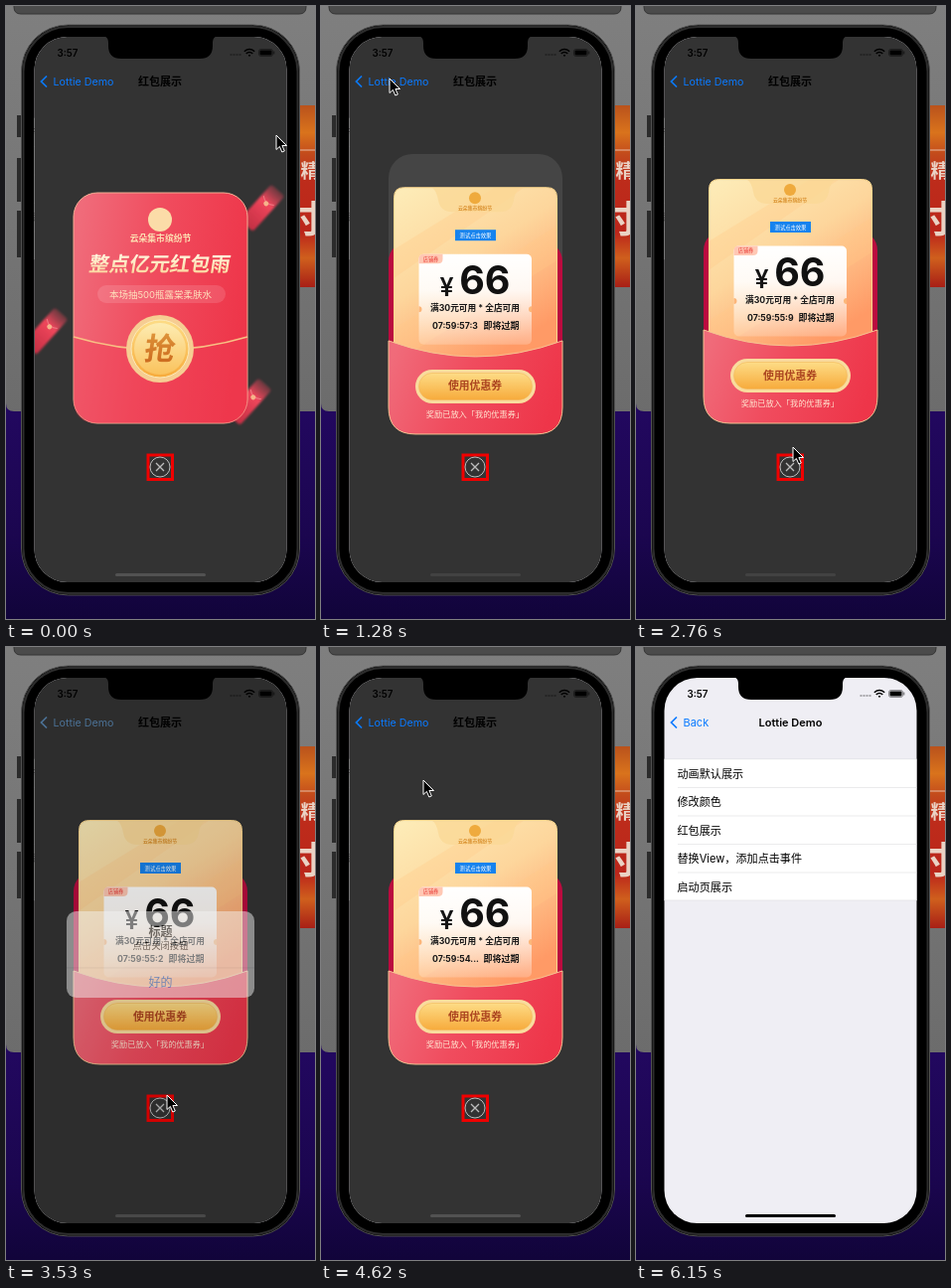
Animation, 311 px wide and 617 px high, one loop 6.45 s. Source, as an HTML page:

```html
<!DOCTYPE html>
<html lang="zh">
<head>
<meta charset="utf-8">
<style>
html, body { margin: 0; width: 100%; height: 100%; overflow: hidden; background: #160646; }
svg { display: block; width: 311px; height: 617px; }
text { font-family: Inter, "Noto Sans CJK SC", "Noto Sans CJK", sans-serif; text-anchor: middle; dominant-baseline: central; }
.left { text-anchor: start; }
.semi { font-weight: 600; }
.bold { font-weight: 700; }
.heavy { font-weight: 900; }
.nav { font-size: 11px; }
</style>
</head>
<body>
<svg viewBox="0 0 311 617" xmlns="http://www.w3.org/2000/svg">
<defs>
  <linearGradient id="wall" x2="0" y2="1"><stop stop-color="#7f7f7f"/><stop offset="1" stop-color="#6c6c6c"/></linearGradient>
  <linearGradient id="purple" x2="0" y2="1"><stop stop-color="#22085f"/><stop offset=".6" stop-color="#1b064f"/><stop offset="1" stop-color="#11043a"/></linearGradient>
  <linearGradient id="poster" x2="0" y2="1"><stop stop-color="#b9521c"/><stop offset=".15" stop-color="#d9731c"/><stop offset=".27" stop-color="#c24a1c"/><stop offset=".4" stop-color="#bd2c1b"/><stop offset=".7" stop-color="#bb261b"/><stop offset=".84" stop-color="#cf5f1d"/><stop offset="1" stop-color="#a81f16"/></linearGradient>
  <linearGradient id="red" y1=".3" y2=".5"><stop stop-color="#f06b7a"/><stop offset=".45" stop-color="#f04c5e"/><stop offset="1" stop-color="#ee3549"/></linearGradient>
  <linearGradient id="paper" x2=".6" y2="1"><stop stop-color="#fdedb9"/><stop offset=".5" stop-color="#fdd69c"/><stop offset="1" stop-color="#ff9a66"/></linearGradient>
  <linearGradient id="sheet" x2="0" y2="1"><stop stop-color="#fff"/><stop offset=".4" stop-color="#fff" stop-opacity=".9"/><stop offset="1" stop-color="#fff" stop-opacity=".2"/></linearGradient>
  <linearGradient id="gold" x2="0" y2="1"><stop stop-color="#fddc86"/><stop offset="1" stop-color="#f7ab3c"/></linearGradient>
  <linearGradient id="coin" x2="0" y2="1"><stop stop-color="#fdecb2"/><stop offset="1" stop-color="#fac25c"/></linearGradient>
  <linearGradient id="amber" x2="0" y2="1"><stop stop-color="#e0973c"/><stop offset="1" stop-color="#c9641a"/></linearGradient>
  <linearGradient id="cream" x2="0" y2="1"><stop stop-color="#fffbe9"/><stop offset="1" stop-color="#fbd496"/></linearGradient>
  <linearGradient id="streak" x2="0" y2="1"><stop stop-color="#e8455a" stop-opacity=".3"/><stop offset=".35" stop-color="#f0475c"/><stop offset="1" stop-color="#dd2f47" stop-opacity=".85"/></linearGradient>
  <filter id="soft" x="-50%" y="-50%" width="200%" height="200%"><feGaussianBlur stdDeviation="1"/></filter>
  <clipPath id="screen"><rect x="28.5" y="31" width="254" height="549" rx="33"/></clipPath>
  <clipPath id="stageClip"><rect x="29" y="44" width="254" height="381"/></clipPath>
  <clipPath id="paperClip"><path d="M73.500 345V184.500q0-10 10-10h144q10 0 10 10V345z"/></clipPath>
  <g id="envelope" transform="rotate(42)">
    <rect x="-9" y="-24" width="18" height="48" rx="3" fill="url(#streak)" filter="url(#soft)"/>
    <path d="M-7-10q7 6 14 0" fill="none" stroke="#f7a2a0" opacity=".6"/>
    <circle cy="-6" r="2.500" fill="#f6b48a"/>
  </g>
</defs>

<rect width="311" height="410" fill="url(#wall)"/>
<rect y="408" width="311" height="209" fill="url(#purple)"/>
<path d="M0 400q0 8 8 8H0z" fill="#22085f"/>
<path d="M8-5h294v6q0 7-7 7H15q-7 0-7-7z" fill="#4b4b4b" stroke="#343434"/>
<rect x="290" y="100" width="21" height="183" fill="url(#poster)"/>
<path d="M295 145h16" stroke="#dd9a78" stroke-width="1.500"/>
<text x="306" y="166" font-size="19" class="bold" fill="#ead2c4">精</text>
<text x="298" y="214" font-size="38" class="heavy" fill="#ead2c4">时</text>
<path d="M13 110v22M13 153v44M13 206v47" stroke="#2b2b2b" stroke-width="4"/>
<rect x="15.500" y="19" width="280" height="574" rx="47" fill="#000" stroke="#505050"/>
<rect x="17.500" y="21" width="276" height="570" rx="45" fill="none" stroke="#2c2c2c" stroke-width="2"/>

<g clip-path="url(#screen)">
  <rect x="28" y="31" width="255" height="550" fill="#efeef4"/>
  <g id="list"></g>
  <g class="nav">
    <path d="M41 70.500l-5.500 5.500 5.500 5.500" fill="none" stroke="#0a7aff" stroke-width="1.700"/>
    <text id="back" class="left" x="47.500" y="76" fill="#0a7aff">Back</text>
    <text id="title" class="semi" x="155.500" y="76">Lottie Demo</text>
  </g>
  <rect x="110" y="571" width="91" height="3" rx="1.500"/>

  <g id="page">
    <rect x="28" y="31" width="256" height="550" fill="#333"/>
    <g class="nav">
      <g id="link">
        <path d="M41 70.500l-5.500 5.500 5.500 5.500" fill="none" stroke-width="1.700"/>
        <text class="left" x="47.500" y="76" font-size="10.700" stroke="none">Lottie Demo</text>
      </g>
      <text class="semi" x="155" y="76">红包展示</text>
    </g>
    <rect id="home" x="110" y="571" width="91" height="3" rx="1.500" fill="#525252"/>
    <g clip-path="url(#stageClip)"><g id="rain"></g></g>

    <rect id="ghost" x="68" y="149" width="175" height="232" rx="24" fill="#fff"/>
    <g id="opened">
      <rect id="wings" x="68" y="226" width="175" height="180" rx="20" fill="#bb0b3f"/>
      <g id="coupon">
        <g clip-path="url(#paperClip)">
          <rect x="73" y="174" width="165" height="172" fill="url(#paper)"/>
          <path d="M60 245L190 165h28L60 275zM60 325L250 205v35L60 360z" fill="#ffc584" opacity=".3"/>
        </g>
        <path d="M73.500 345V184.500q0-10 10-10h144q10 0 10 10V345" fill="none" stroke="#f9d58c"/>
        <path d="M112 175q4 2 6 12 2 12 14 12h48q12 0 14-12 2-10 6-12z" fill="#fbd996" opacity=".75"/>
        <circle cx="155" cy="185" r="6" fill="#efaa3d"/>
        <text x="155" y="195" font-size="4.900" class="bold" fill="#d9902f">云朵集市缤纷节</text>
        <rect x="135" y="217" width="41" height="11" fill="#1683ee"/>
        <text x="155.500" y="222.500" font-size="5.300" fill="#fff">测试点击效果</text>
        <rect x="98.500" y="241.500" width="113.500" height="91" rx="5" fill="url(#sheet)"/>
        <path d="M98.500 251v-5q0-4.500 5-4.500h19v5q0 4.500-5 4.500z" fill="#ffc8b4"/>
        <text x="110.500" y="246.300" font-size="5.200" fill="#e93a35">店铺券</text>
        <path d="M98.500 294a3 3 0 0 1 0 6zM212 294a3 3 0 0 0 0 6z" fill="#fcb679"/>
        <text x="126.500" y="274.500" font-size="25" class="semi" fill="#151515">¥</text>
        <text x="164.800" y="267.500" font-size="39.500" class="bold" fill="#111">66</text>
        <text x="155" y="296" font-size="8.700" class="bold" fill="#171717">满30元可用 * 全店可用</text>
        <text id="timer" x="112" y="313.700" font-size="8.700" class="left bold" fill="#171717"></text>
        <text x="181.500" y="313.700" font-size="9" class="bold" fill="#171717">即将过期</text>
      </g>
      <g id="pocket">
        <path d="M68 326Q155.500 358 243 326V393q0 27-27 27H95q-27 0-27-27z" fill="url(#red)" stroke="#f6c392"/>
        <rect x="95" y="355" width="121" height="34" rx="17" fill="#f9dc9d"/>
        <rect x="98.500" y="358.500" width="114" height="27" rx="13.500" fill="url(#gold)" stroke="#f2b85c" stroke-width=".6"/>
        <text x="155" y="372" font-size="10.800" class="bold" fill="#ac4520">使用优惠券</text>
        <text x="155" y="400" font-size="8.200" fill="#ffe4cf">奖励已放入「我的优惠券」</text>
      </g>
    </g>
    <g id="cover">
      <rect x="68" y="188" width="175" height="232" rx="24" fill="url(#red)" stroke="#f4ae94"/>
      <path d="M68 333Q155.500 359 243 333V396q0 24-24 24H92q-24 0-24-24z" fill="#ee3b50" opacity=".35"/>
      <path d="M68 333Q155.500 359 243 333" fill="none" stroke="#f8c184" stroke-width="1.500"/>
      <circle cx="155" cy="215" r="12" fill="#fbdca8"/>
      <text x="155.500" y="233.500" font-size="8.800" class="bold" fill="#fde0b3">云朵集市缤纷节</text>
      <text transform="translate(155 259.500) skewX(-9)" font-size="20.300" class="heavy" fill="url(#cream)">整点亿元红包雨</text>
      <rect x="92" y="281" width="129" height="18" rx="9" fill="#fff" opacity=".13"/>
      <text x="155.500" y="290" font-size="9.500" fill="#fee2bd">本场抽500瓶露棠柔肤水</text>
      <circle cx="155" cy="345" r="34" fill="#f6cd92"/>
      <circle cx="155" cy="345" r="29" fill="url(#gold)" stroke="#fdeab8"/>
      <circle cx="155" cy="345" r="26" fill="url(#coin)"/>
      <text transform="translate(155 345) skewX(-8)" font-size="31" class="heavy" fill="url(#amber)">抢</text>
    </g>

    <rect x="143" y="452" width="24.500" height="24.500" fill="#333" stroke="#f00000" stroke-width="3"/>
    <g fill="none" stroke="#bdbdbd"><circle cx="155" cy="464" r="10"/><path d="M151 460l8 8m0-8l-8 8" stroke-width="1.300"/></g>
  </g>

  <rect id="dim" x="28" y="31" width="256" height="550"/>
  <g id="alert">
    <rect x="-88" y="-40.500" width="176" height="81" rx="9" fill="#f3f3f3" opacity=".95"/>
    <text y="-21" font-size="11.200" class="semi">标题</text>
    <text y="-8" font-size="8.700">点击关闭按钮</text>
    <path d="M-88 12.500H88" stroke="#c6c6c8" stroke-width=".6"/>
    <text y="26.500" font-size="11.200" fill="#0a7aff">好的</text>
  </g>

  <path d="M96 30q7 0 7 7v3q0 13 13 13h79q13 0 13-13v-3q0-7 7-7z"/>
  <text x="62" y="47.500" font-size="9.800" class="semi">3:57</text>
  <path d="M225.500 49h11" stroke="#000" opacity=".3" stroke-width="1.800" stroke-dasharray="2 1"/>
  <g fill="none" stroke="#000" stroke-width="1.500"><path d="M239.800 45.700q5.200-4.400 10.400 0M241.700 47.900q3.300-2.800 6.600 0"/><path d="M244 49.800h2"/></g>
  <rect x="254.500" y="43.500" width="14" height="7" rx="2" fill="none" stroke="#000" stroke-width=".7" opacity=".6"/>
  <rect x="255.500" y="44.500" width="12" height="5" rx="1"/>
  <path d="M269.800 45.500v3" stroke="#000" opacity=".6"/>
</g>
<path id="cursor" d="M0 0V14.500L3.400 11.400 5.800 17 8.300 16 5.900 10.500H10.500z" stroke="#fff" stroke-linejoin="round"/>
</svg>

<script>
const LOOP = 6450;
const $ = id => document.getElementById(id);
const clamp = x => Math.max(0, Math.min(1, x));
const smooth = x => { x = clamp(x); return x * x * (3 - 2 * x); };
const move = (id, x, y, extra = '') => $(id).setAttribute('transform', `translate(${x} ${y})${extra}`);
const fade = (id, value) => $(id).setAttribute('opacity', value);

// Keys are [time, ...values].
function track(keys, t, ease = smooth) {
  const i = keys.findIndex(k => k[0] > t);
  if (i < 0) return keys[keys.length - 1].slice(1);
  const [a, b] = [keys[i - 1], keys[i]];
  const p = ease((t - a[0]) / (b[0] - a[0]));
  return a.slice(1).map((v, n) => v + (b[n + 1] - v) * p);
}

const pointer = [
  [0, 272, 130], [600, 272, 130], [1010, 69, 73], [2250, 69, 73], [2760, 158, 444],
  [2880, 162, 451], [3600, 162, 451], [4000, 152, 335], [4100, 152, 335], [4620, 103, 134],
  [4780, 103, 134], [4950, 32, 430], [5370, 204, 469], [5800, 204, 469], [6140, 200, 620]
];
const swipe = [[0, 0], [4950, 0], [5370, 172], [5490, 236], [5640, 255]];
const drops = [[258, 203], [40, 327], [245, 398], [335, 60], [180, -30], [262, -70], [340, 180]];

$('rain').innerHTML = drops.map(([x, y]) => `<use href="#envelope" transform="translate(${x} ${y})"/>`).join('');

const rows = ['动画默认展示', '修改颜色', '红包展示', '替换View，添加点击事件', '启动页展示'];
$('list').innerHTML = '<rect x="20" y="113" width="280" height="142" fill="#fff"/>' +
  '<path d="M20 112.700h280M20 255h280" stroke="#dcdce0" stroke-width=".6"/>' +
  rows.map((row, i) => {
    const y = 113 + i * 28.5;
    return `<text class="left" x="41.500" y="${y + 14.5}" font-size="11.100">${row}</text>` +
      (i ? `<path d="M42 ${y}h260" stroke="#dddde0" stroke-width=".6"/>` : '');
  }).join('');

function countdown(t) {
  const tenths = Math.floor(573.5 - (t - 1280) * 0.0095);
  const digit = tenths % 10;
  return `07:59:${Math.floor(tenths / 10)}${digit < 2 ? '...' : ':' + digit}`;
}

function draw(t) {
  const open = smooth((t - 600) / 400);
  const bounce = t > 1040 && t < 2000
    ? 11 * Math.sin(Math.PI * (t - 1040) / 480) * Math.exp(-Math.max(0, t - 1280) / 200) : 0;
  move('cover', 0, -39 * open);
  fade('cover', 1 - open);
  fade('opened', smooth((t - 550) / 150));
  move('coupon', 0, 55 * (1 - open) + bounce * 0.75);
  move('pocket', 0, bounce);
  move('wings', 0, bounce);
  fade('ghost', 0.09 * open * (1 - smooth((t - 1300) / 400)));
  move('rain', -0.22 * t, 0.25 * t);
  fade('rain', 1 - smooth((t - 650) / 350));
  $('timer').textContent = countdown(t);

  const leaving = t >= 4060;
  const shown = leaving ? 1 - smooth((t - 4060) / 260) : smooth((t - 3410) / 240);
  const scale = leaving ? 1 : 1.15 - 0.15 * shown;
  move('alert', 155.5, 309.5, ` scale(${scale})`);
  fade('alert', shown);
  fade('dim', 0.24 * shown);
  const tint = shown > 0.3 ? '#5681aa' : '#0a7aff';
  $('link').setAttribute('fill', tint);
  $('link').setAttribute('stroke', tint);
  fade('home', t > 900 && t < 3410 ? 0.5 : 1);

  const [x] = track(swipe, t, clamp);
  const rest = 1 - x / 255;
  move('page', x, 0);
  move('list', -76 * rest, 0);
  move('title', -70 * rest, 0);
  move('back', -76 * rest, 0);
  move('cursor', ...track(pointer, t));
}

const start = performance.now();
function tick() {
  draw((performance.now() - start) % LOOP);
  requestAnimationFrame(tick);
}
draw(0);
requestAnimationFrame(tick);
</script>
</body>
</html>
```
